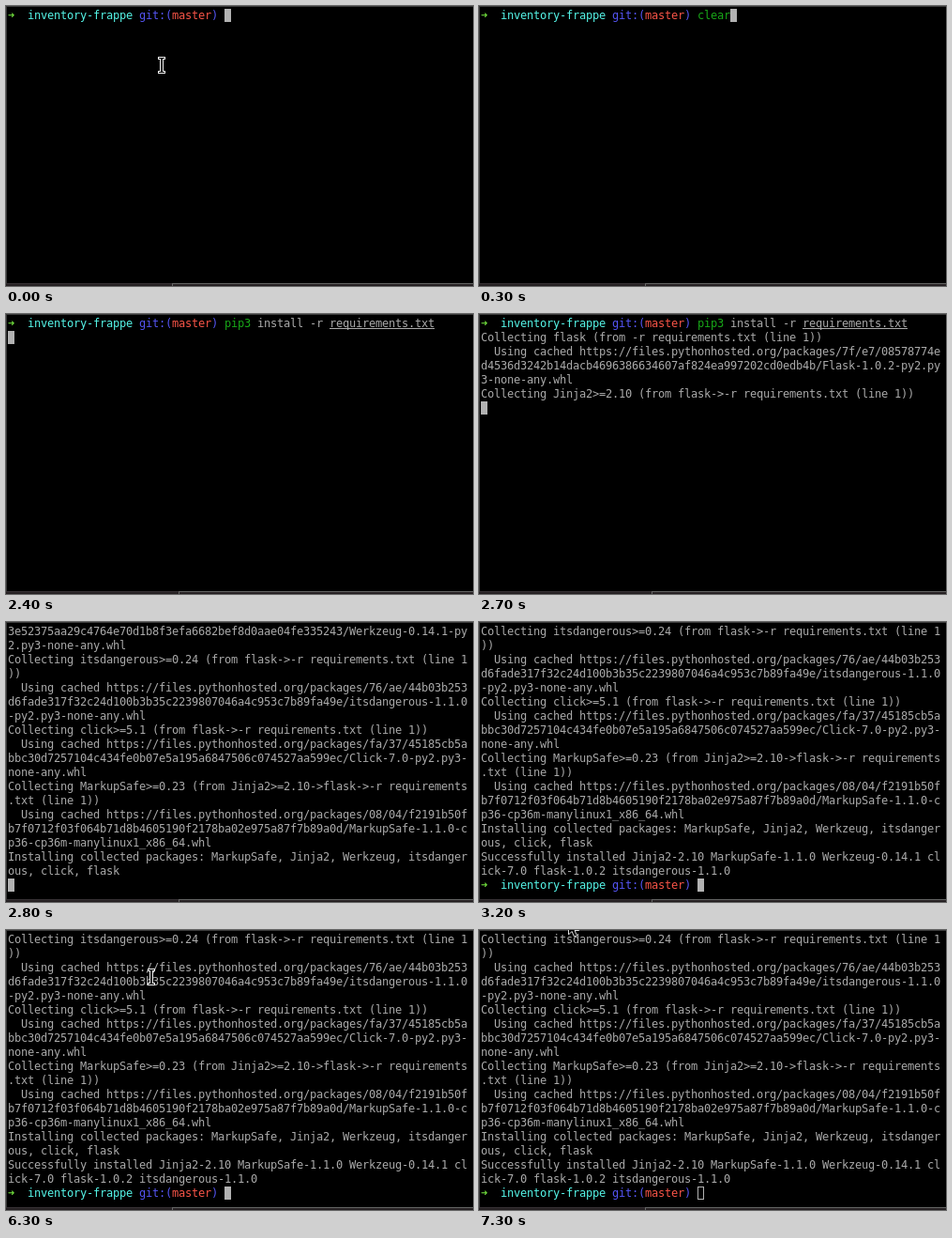
Recreate the animation shown at these times as an HTML page with a canvas. Size 498x298 px, loop 7.7 s.

```html
<!DOCTYPE html>
<html lang="en">
<head>
<meta charset="utf-8">
<title>Terminal: installing requirements</title>
<style>
  html, body { margin: 0; width: 498px; height: 298px; overflow: hidden; background: #000; }
  canvas { display: block; }
</style>
</head>
<body>
<canvas id="stage" width="498" height="298"></canvas>
<script>
const ctx = document.getElementById('stage').getContext('2d');
const LOOP = 7700, COLS = 70, ROWS = 19, CELL_W = 7, CELL_H = 15, LEFT = 2, TOP = 3;
const GRAY = '#aaaaaa', GREEN = '#18a818', CYAN = '#55f5e8', BLUE = '#5555f5', RED = '#fa5548', LIME = '#6fdc3c';

// A line is a list of [text, colour, underlined] parts.
const prompt = [['➜', LIME], ['  inventory-frappe', CYAN], [' git:(', BLUE], ['master', RED], [') ', BLUE]];
const clear = [...prompt, ['clear', GREEN]];
const command = [...prompt, ['pip3', GREEN], [' install -r ', GRAY], ['requirements.txt', GRAY, true]];

const wrap = text => text.match(new RegExp(`.{1,${COLS}}`, 'g')).map(row => [[row, GRAY]]);
const output = text => text.split('\n').flatMap(wrap);
const host = '  Using cached https://files.pythonhosted.org/packages/';

const first = output(`Collecting flask (from -r requirements.txt (line 1))
${host}7f/e7/08578774ed4536d3242b14dacb4696386634607af824ea997202cd0edb4b/Flask-1.0.2-py2.py3-none-any.whl
Collecting Jinja2>=2.10 (from flask->-r requirements.txt (line 1))`);

const second = output(`3e52375aa29c4764e70d1b8f3efa6682bef8d0aae04fe335243/Werkzeug-0.14.1-py2.py3-none-any.whl
Collecting itsdangerous>=0.24 (from flask->-r requirements.txt (line 1))
${host}76/ae/44b03b253d6fade317f32c24d100b3b35c2239807046a4c953c7b89fa49e/itsdangerous-1.1.0-py2.py3-none-any.whl
Collecting click>=5.1 (from flask->-r requirements.txt (line 1))
${host}fa/37/45185cb5abbc30d7257104c434fe0b07e5a195a6847506c074527aa599ec/Click-7.0-py2.py3-none-any.whl
Collecting MarkupSafe>=0.23 (from Jinja2>=2.10->flask->-r requirements.txt (line 1))
${host}08/04/f2191b50fb7f0712f03f064b71d8b4605190f2178ba02e975a87f7b89a0d/MarkupSafe-1.1.0-cp36-cp36m-manylinux1_x86_64.whl
Installing collected packages: MarkupSafe, Jinja2, Werkzeug, itsdangerous, click, flask`);

const done = output('Successfully installed Jinja2-2.10 MarkupSafe-1.1.0 Werkzeug-0.14.1 click-7.0 flask-1.0.2 itsdangerous-1.1.0');

// Each entry: start time, then its value. The last line holds the cursor.
const screens = [
  [0, [prompt]],
  [300, [clear]],
  [1000, [command]],
  [1900, [command, []]],
  [2700, [command, ...first, []]],
  [2800, [command, ...first, ...second, []]],
  [3200, [command, ...first, ...second, ...done, prompt]]
];
const pointers = [
  [0, () => beam(162, 54)],
  [300, null],
  [6300, () => beam(151, 41)],
  [6400, () => beam(101, 0)],
  [6500, null],
  [6900, () => arrow(96, -14)],
  [7000, () => arrow(95, -11)]
];
const at = (steps, t) => steps.filter(s => s[0] <= t).pop()[1];

function box(color, x, y, w, h) {
  ctx.fillStyle = color;
  ctx.fillRect(x, y, w, h);
}

function beam(x, y) {
  box('#f0f0f0', x, y, 8, 3);
  box('#f0f0f0', x, y + 15, 8, 3);
  box('#f0f0f0', x + 2, y, 4, 18);
  box('#000', x + 1, y + 1, 6, 1);
  box('#000', x + 1, y + 16, 6, 1);
  box('#000', x + 3, y + 1, 2, 16);
}

function arrow(x, y) {
  const shape = new Path2D('M.5 .5V16L4 12.5 6.5 18 9.5 17 7 11.5H11.5Z');
  ctx.save();
  ctx.translate(x, y);
  ctx.fillStyle = '#000';
  ctx.fill(shape);
  ctx.strokeStyle = '#e0e0e0';
  ctx.stroke(shape);
  ctx.restore();
}

function drawLine(line, y) {
  let x = LEFT;
  for (const [text, color, underlined] of line) {
    ctx.fillStyle = color;
    if (underlined) ctx.fillRect(x, y + 12, text.length * CELL_W, 1);
    for (const char of text) {
      ctx.fillText(char, x, y + 11);
      x += CELL_W;
    }
  }
  return x;
}

function drawFrame(split) {
  box('#3a3a3a', 0, 0, 498, 1);
  box('#3a3a3a', 0, 0, 1, 298);
  box('#252022', 0, 296, 498, 2);
  box('#383336', 0, 295, split, 1);
  box('#666666', split, 295, 498 - split, 1);
  box('#666666', split, 295, 1, 3);
}

function draw(now) {
  const t = now % LOOP;
  box('#000', 0, 0, 498, 298);
  drawFrame(t >= 2400 && t < 4700 ? 184 : 177);
  ctx.font = '12px "DejaVu Sans Mono", monospace';
  let x, y;
  at(screens, t).slice(-ROWS).forEach((line, row) => {
    y = TOP + row * CELL_H;
    x = drawLine(line, y);
  });
  box('#b2b2b2', x, y, 7, 14);
  if (t >= 7300) box('#000', x + 1, y + 1, 5, 12);
  at(pointers, t)?.();
}

const start = performance.now();
function tick() {
  draw(performance.now() - start);
  requestAnimationFrame(tick);
}
tick();
</script>
</body>
</html>
```
